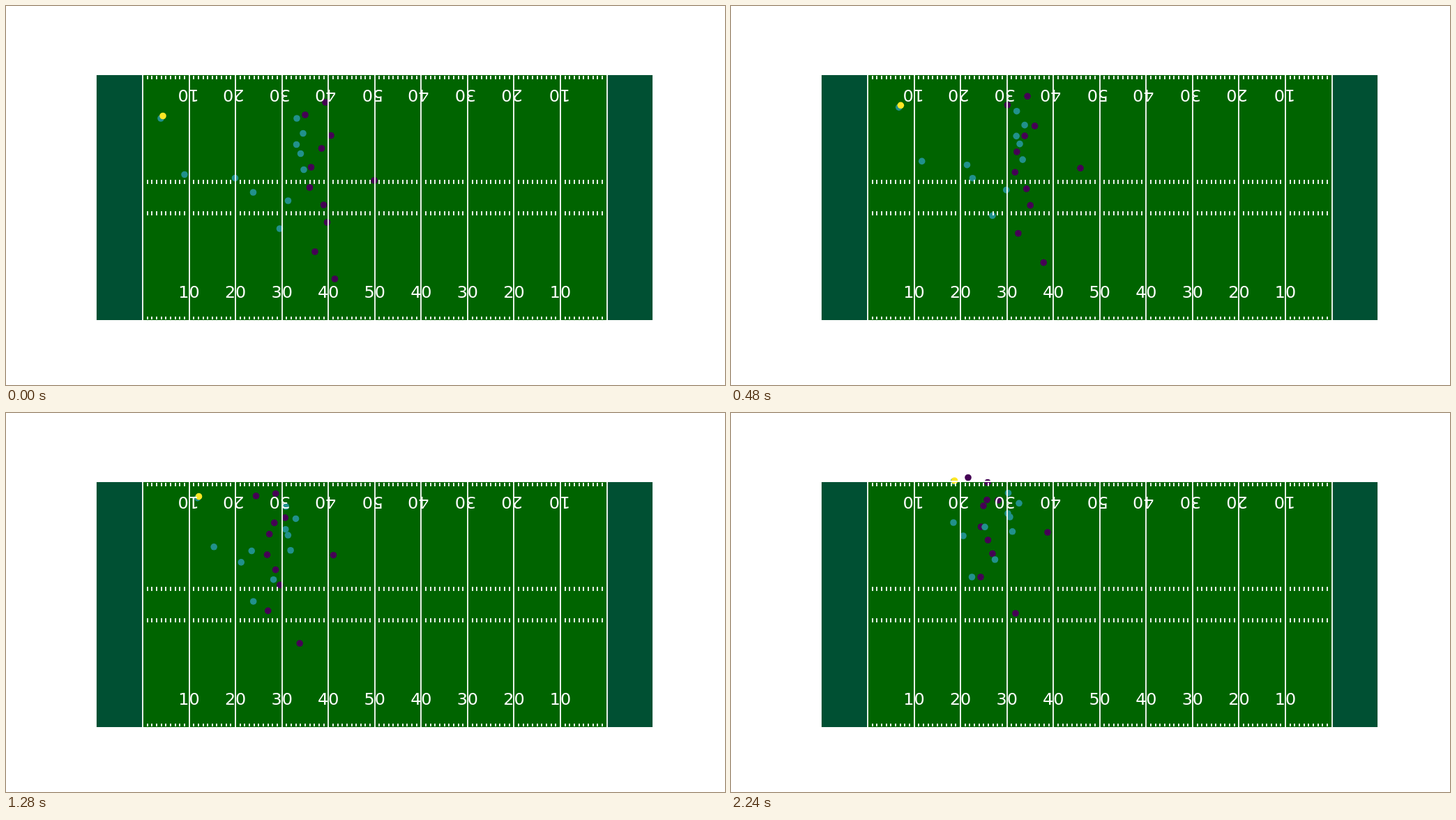
An HTML page that plays this animation: 1031x543 px, repeating every 2.32 s.

```html
<!DOCTYPE html>
<html lang="en">
<head>
<meta charset="utf-8">
<title>Football play</title>
<style>
  html, body { margin: 0; width: 100%; height: 100%; overflow: hidden; background: #fff; }
  svg { display: block; }
  text { font: 23.86px "DejaVu Sans", sans-serif; fill: #fff; text-anchor: middle; }
  .lines { fill: none; stroke: #fff; stroke-width: 1.79; stroke-linecap: square; }
</style>
</head>
<body>
<svg id="stage" width="1031" height="543" viewBox="0 0 1031 543"></svg>
<script>
const STEP = 80, STEPS = 29;
const TOP = 98, BOTTOM = 451;
const DEFENSE = '#440154', OFFENSE = '#21918c', BALL = '#fde725';
const stage = document.getElementById('stage');

function add(tag, attrs) {
  const node = document.createElementNS('http://www.w3.org/2000/svg', tag);
  for (const key in attrs) node.setAttribute(key, attrs[key]);
  return stage.appendChild(node);
}

const yardX = yard => 129.45 + 6.6555 * yard;
const snapX = yard => Math.round(yardX(yard));

// Each run goes from one point to another: [x, y, endX, endY].
// A positive slowdown brakes toward the end, a negative one accelerates.
const groups = [
  { color: DEFENSE, slowX: 0.9, slowY: 0.06, runs: [
    [458, 138, 368, 99.5],
    [429, 156, 340, 92.5],
    [466, 185.5, 383, 125],
    [452.5, 204, 367, 124.5],
    [437.5, 231, 362, 133],
    [435.5, 260, 358.5, 163],
    [455.5, 285, 368.5, 182],
    [460.5, 310, 375, 201.5],
    [443, 352, 358, 235],
    [471.5, 391, 408, 287],
    [528.2, 250, 454, 171]
  ] },
  { color: OFFENSE, slowX: 0.95, slowY: 0.05, runs: [
    [354.5, 267, 333, 176],
    [404.5, 279, 378.5, 210],
    [392.5, 319, 345.5, 235],
    [417, 161, 397.5, 114.7],
    [426, 182.5, 413, 129.3],
    [416.5, 198.5, 397, 144],
    [422.5, 211.5, 400, 149],
    [427, 234.5, 403.5, 169.8]
  ] },
  { color: OFFENSE, slowX: 0.4, slowY: 0.07, runs: [
    [256, 241.5, 319, 157],
    [328.5, 246.5, 364, 163.3]
  ] },
  { color: OFFENSE, slowX: -0.13, slowY: 0.22, runs: [[222, 161, 319.5, 98]] },
  { color: BALL, slowX: -0.13, slowY: 0.22, runs: [[225, 157.5, 320.5, 97]] }
];

const glide = (from, to, slow, t) => from + (to - from) * (t + slow * t * (1 - t));

function addZone(from, to, fill) {
  const x = snapX(from);
  add('rect', { x, y: TOP, width: snapX(to) - x, height: BOTTOM - TOP, fill });
}

addZone(0, 120, '#006400');
addZone(0, 10, '#005033');
addZone(110, 120, '#005033');

const players = groups.flatMap(({ color, slowX, slowY, runs }) =>
  runs.map(run => ({ run, slowX, slowY, dot: add('circle', { r: 4.8, fill: color }) })));

// Border, yard lines and hash marks lie above the players.
let d = `M${snapX(0)} ${TOP}H${snapX(120)}V${BOTTOM}H${snapX(0)}Z`;
for (let yard = 10; yard <= 110; yard += 10) d += `M${snapX(yard)} ${TOP}V${BOTTOM}`;
for (let yard = 11; yard < 110; yard++) {
  for (const [y1, y2] of [[101, 104], [250, 254], [295, 299], [446, 448]]) {
    d += `M${snapX(yard)} ${y1}V${y2}`;
  }
}
add('path', { d, class: 'lines' });

const flippedShift = { 10: -0.9, 40: -4.1 };
for (let yard = 20; yard <= 100; yard += 10) {
  const label = Math.min(yard, 120 - yard) - 10;
  const x = yardX(yard);
  const flippedX = x + (flippedShift[label] ?? -2.9);
  add('text', { x, y: 418 }).textContent = label;
  add('text', { transform: `translate(${flippedX} 120) rotate(180)` }).textContent = label;
}

function render(ms) {
  const t = Math.floor(ms / STEP) % STEPS / (STEPS - 1);
  for (const { run: [x, y, endX, endY], slowX, slowY, dot } of players) {
    dot.setAttribute('cx', glide(x, endX, slowX, t).toFixed(2));
    dot.setAttribute('cy', glide(y, endY, slowY, t).toFixed(2));
  }
}

const start = performance.now();
function tick() {
  render(performance.now() - start);
  requestAnimationFrame(tick);
}
tick();
</script>
</body>
</html>
```
